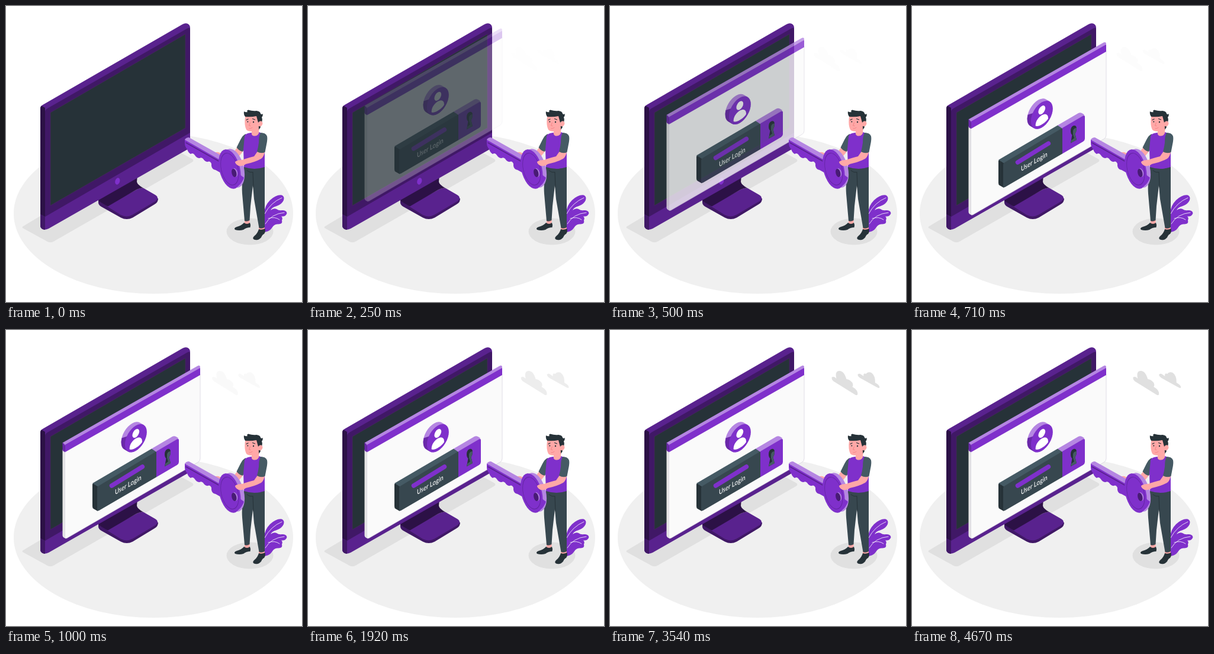
An HTML page for the animation above (4.75 s loop, 500 px wide and 500 px high).

```html
<!DOCTYPE html>
<html lang="en">
<head>
<meta charset="utf-8">
<title>User login</title>
<style>
  html, body { margin: 0; width: 100%; height: 100%; overflow: hidden; background: #fff; }
  svg { display: block; width: 100%; height: 100%; }
  .main { fill: #7f30cb; }
  .mid { fill: #59228e; }
  .deep { fill: #401866; }
  .night { fill: #2c1146; }
  .pale { fill: #b586e2; }
  .ink { fill: #263238; }
  .slate { fill: #37474f; }
  .steel { fill: #455a64; }
  .skin { fill: #ffa8a7; }
  .floor { fill: #f0f0f0; }
  .shade { fill: #e0e0e0; }
  .white { fill: #fff; }
  .line { fill: none; stroke-linecap: round; stroke-linejoin: round; }
  text { font: 500 12px Lato, Roboto, sans-serif; fill: #fff; }
</style>
</head>
<body>
<svg viewBox="0 0 500 500">
  <ellipse class="floor" cx="249" cy="350.500" rx="236" ry="135.500"/>
  <path class="shade" d="M29 372L66 350 290 245 314 258Q319 261 314 264L80 398Q75 400.500 70 398L29 375.500Q26 374 29 372Z"/>
  <ellipse class="shade" cx="412" cy="381" rx="39.500" ry="22.500"/>

  <g id="clouds" class="shade">
    <path d="M373 80.500Q374 78 378 79.500L381 82Q378 69 386 69Q394 69 398 83Q403 83 408 89Q410 93 408 96Q417 101 417 108Q417 111 413 109.500L376 86.500Q373 84 373 80.500Z"/>
    <path d="M417 75.500Q419 72 424 76L427 78Q426 72 431 74Q434 70 440 72Q447 77 446.500 89Q454 93 454 97Q453 99 449 96.500L421 81Q417 78 417 75.500Z"/>
  </g>

  <g id="monitor">
    <path class="deep" d="M156 326V332Q156 336 161 339L194 357.500Q204 362.500 214 357.500L251 335Q257 332 257 325Z"/>
    <path class="mid" d="M170 338L219 311Q226 307 232 307.500L252 319Q260 324 252 330L214 352.500Q204 358 194 353Z"/>
    <path class="night" d="M156 327L160 321 222 286 221 297Q222 302 232 307.500Q226 307 219 311L172 338.500 159 331Q156 329 156 327Z"/>
    <path class="mid" d="M58 173Q58 169 62 167L298 31Q303 28 307 30Q311 32 311 37V235Q311 240 307 242L72 376Q66 379 62 377Q58 375 58 371Z"/>
    <path class="night" d="M58 173Q58 170 60 168.500L66 172V356L58 352Z"/>
    <path class="deep" d="M58 352L66 356V378Q64 378 62 377Q58 375 58 371Z"/>
    <path class="deep" d="M66 179Q66 175 70 173L306 38Q311 35 311 40V214L66 356Z"/>
    <path class="ink" d="M75 180L303 47.500V206L75 337Z" stroke="#4b2a60" stroke-width=".6"/>
    <ellipse class="main" cx="188.300" cy="296" rx="3.900" ry="5.800" transform="rotate(18 188.300 296)"/>
  </g>

  <g id="panel">
    <path fill="#e6e6e6" d="M95.500 202L101 206V352.500L97.500 350.500Q95.500 349 95.500 347Z"/>
    <path d="M99.500 205L328 75V217Q328 221 325 223L103 351.500Q99.500 353 99.500 349Z" fill="#fafafa" stroke="#d9d5e0" stroke-width=".8"/>
    <path class="pale" d="M95.500 190.500L324 60.500Q328 59 328 63L326 67 100 196Z"/>
    <path class="main" d="M99.500 194L328 64V76L99.500 206.500Z"/>
    <path fill="#6a28a9" d="M95.500 190L99.500 194V206.500L95.500 203.500Z"/>

    <g transform="matrix(.866 -.5 0 1 219.300 182.800)">
      <path class="line" d="M-7.300-7.400L0 0" stroke="#b586e2" stroke-width="42.600"/>
      <path fill="#6a28a9" d="M-27.500-14A21.300 21.300 0 0 0-22.400 7.700L-15.100 15.100-10-10Z"/>
      <circle class="main" r="21.300"/>
      <circle class="white" cy="-8.200" r="6.800"/>
      <path class="white" d="M-12.300 12.500C-13-3.500 13-3.500 12.300 12.500C7 17.500-7 17.500-12.300 12.500Z"/>
    </g>

    <path class="steel" d="M146 259L246 200.500 256 205 154 266Z"/>
    <path class="ink" d="M146 262Q145.500 259 148 260L155 264.500V306L148 302Q146 301 146 298Z"/>
    <path class="slate" d="M154 267Q154 264.500 157 263L254 205V248.500L157 305Q154 306.500 154 303Z"/>
    <path class="pale" d="M246 200.500L281 180Q284 178.500 287 180L291 182.500 288 188 254 206Z"/>
    <path class="main" d="M254 205L289 184.500Q292 183 292 186V223Q292 226 289 228L254 248.500Z"/>
    <path class="ink" d="M268 210Q268 203 273 201Q278 200 278 206Q278 211 275.500 215L278 225 268 230.500 270.500 217Q268 215 268 210Z"/>
    <path class="steel" d="M272 210Q273 205 278 205Q278 211 275.500 215L278 225 268 230.500 269 226 274 222 272 216Z"/>
    <path class="line" d="M178.500 263L230.500 231" stroke="#7f30cb" stroke-width="7.400"/>
    <text transform="matrix(.8 -.462 0 1 184 278.500)">User Login</text>
  </g>

  <g id="plant">
    <path class="main" d="M436 382V350Q437 337 446 328Q457 318 466 319.500Q471 322 469 328Q466 335 457 338Q449 340 447 345Q452 341 457 343Q461 346 466 345Q474 345 474.500 350Q473 356 465 355.500Q468 358 466 362Q468 369 459 368.500Q453 368 449 375Q445 381 436 382Z"/>
    <path class="line" d="M437 351Q447 332 466 324M438 368Q448 351 470 349M443 359Q454 355 462 361" stroke="#fff" stroke-width=".8"/>
  </g>

  <g id="man">
    <path class="skin" d="M391 238L400 246 391 257 381 252ZM351 249Q354 246 359 247L367 251 363 257Z"/>
    <path class="steel" d="M405 216Q400 218 396 226L389.500 239Q394 245 400 246L407 234Z"/>
    <path class="skin" d="M403 361H411.500V369H403ZM427 373H437V380H427Z"/>
    <path class="ink" d="M402 366Q407 370 412 366Q414 370 412.500 374Q406 374 401 378Q394 380 387 378Q384 375 390 373Q398 371 402 366ZM427 377Q432 379 437.500 376Q439 381 436 385Q433 386 431 391Q426 397 419 394.500Q415 392 420 388Q425 384 427 377Z"/>
    <path class="slate" d="M402 270H437V310Q437 340 437 374Q432 377 427.500 375L419 326 417 303 413 338 411.500 362Q407 365 403 363L399 317Q398 302 400 292Z"/>
    <path class="line" d="M407 278Q412 282 417 281M417 281L418 306" stroke="#263238" stroke-width="1"/>
    <path class="main" d="M403 220Q404 215 414 214L427 213Q435 215 437 221V272Q420 278 402 272L401 242Z"/>
    <path class="skin" d="M415 203L428 200 427 215Q424 221 417 219Q414 217 415 213Z"/>
  </g>

  <g id="key">
    <path class="main" d="M302 226L306 224 367 258 363 282 354 277Q348 276 347 270Q348 264 343 262.500Q337 265 333 258Q330 255 327 257Q322 257 319 252Q316 247 312 250Q308 248 306 242Q302 237 302 232Z"/>
    <path class="pale" d="M302 226Q304 222 309 222L368 255 363 261Z"/>
    <path class="line" d="M304 231L361 263" stroke="#59228e" stroke-width="1.600"/>
    <g transform="matrix(.866 .5 0 1 384.500 274)"><ellipse class="pale" rx="21.500" ry="31"/></g>
    <path class="main" d="M384 307Q396 306 402 290L394 284Z"/>
    <g transform="matrix(.866 .5 0 1 377.800 275.500)">
      <ellipse class="main" rx="21.700" ry="31.500"/>
      <ellipse class="line" rx="17.500" ry="25.500" stroke="#6425a3" stroke-width="1"/>
    </g>
    <ellipse class="pale" cx="386.500" cy="281.500" rx="4.500" ry="7.300" transform="rotate(-15 386.500 281.500)"/>
    <ellipse fill="#481b75" cx="385.300" cy="282" rx="4" ry="7.200" transform="rotate(-15 385.300 282)"/>
  </g>

  <g id="front">
    <path class="skin" d="M426 244L437 246Q436 254 431 258Q420 264 405 267Q400 271 393 270Q387 267 387 263Q391 260 399 260Q407 257 419 254Z"/>
    <path class="steel" d="M430 214Q439 214 441 220Q442 225 440 234L437.500 247Q431 250 424 246Q426 239 427 231Q427 219 430 214Z"/>
    <path class="ink" d="M405 188Q401 184 402 178Q404 180 408 179Q406 177 409 175.500Q417 178 423 177Q430 178 430 182Q432 184 434 182Q434 186 432 188Q434 193 431 199L429 207 424 203 421 190Z"/>
    <path class="skin" d="M404 187Q414 188 423 186L426 197Q429 193 432 195Q435 198 432 202Q429 205 427 203Q427 210 419 211Q410 213 406 209Q402 201 404 187Z"/>
    <path class="ink" d="M427 203L430 204 427 209Z"/>
    <circle class="ink" cx="408.300" cy="195.500" r="1.100"/>
    <circle class="ink" cx="418" cy="196" r="1.200"/>
    <path class="line" d="M406 192.500L409 191M416.500 190.500L420.500 192" stroke="#263238" stroke-width="1.200"/>
    <path class="line" d="M412.500 197L410.500 202 413 202.500M411 207Q414 207 416 205.500" stroke="#f27f83" stroke-width=".9"/>
  </g>
</svg>
<script>
  const LOOP = 4750;
  const LEAD = 20;
  const panel = document.getElementById('panel');
  const clouds = document.getElementById('clouds');

  const bezier = (a, b, s) => 3 * (1 - s) ** 2 * s * a + 3 * (1 - s) * s * s * b + s ** 3;

  // Cubic-bezier ease with a slight overshoot near the end
  function ease(t) {
    if (t >= 1) return 1;
    let low = 0, high = 1;
    for (let i = 0; i < 24; i++) {
      const mid = (low + high) / 2;
      if (bezier(.36, .5, mid) < t) low = mid; else high = mid;
    }
    return bezier(-.01, 1.38, low);
  }

  function slideIn(node, progress, dx, dy) {
    const k = ease(progress);
    node.setAttribute('opacity', Math.max(0, Math.min(1, k)));
    node.setAttribute('transform', `translate(${dx * (1 - k)} ${dy * (1 - k)})`);
  }

  const start = performance.now();
  function draw() {
    const t = (performance.now() - start) % LOOP + LEAD;
    slideIn(panel, t / 1000, 0, -30);
    slideIn(clouds, t / LOOP, -30, 0);
    requestAnimationFrame(draw);
  }
  draw();
</script>
</body>
</html>
```
